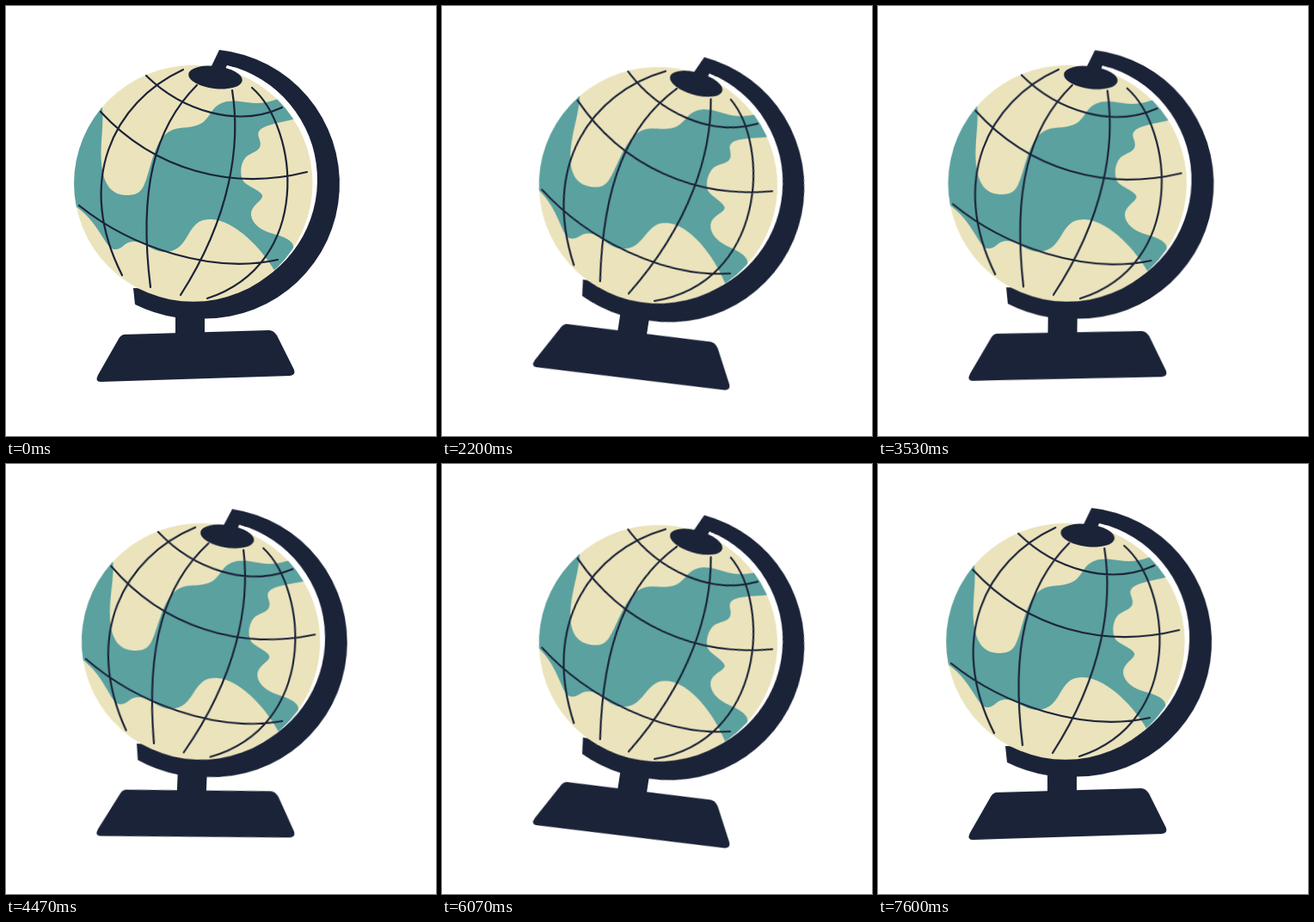
Animation of 500 by 500 pixels, one loop 7.66 s. Source, as an HTML page:

```html
<!DOCTYPE html>
<html lang="en">
<head>
<meta charset="utf-8">
<title>Rocking globe</title>
<style>
  html, body { margin: 0; width: 100%; height: 100%; overflow: hidden; background: #fff; }
  svg { display: block; width: 100%; height: 100%; }
  .ink { fill: #1b2338; }
  .sea { fill: #ebe3bb; }
  .land { fill: #5aa1a0; }
  .grid { fill: none; stroke: #1b2338; stroke-width: 2.2; stroke-linecap: round; }

  /* Paused: the script picks the pose through --n, in steps of 40 ms. */
  #toy {
    --n: 0;
    transform-origin: 221px 427px;
    animation: rock 3840ms infinite paused;
    animation-delay: calc(var(--n) * -40ms);
  }
  @keyframes rock {
    0% { transform: rotate(0deg); animation-timing-function: cubic-bezier(.333, 0, .667, 1); }
    50% { transform: rotate(9.9deg); animation-timing-function: cubic-bezier(.167, 0, .667, 1); }
    100% { transform: rotate(0deg); }
  }
</style>
</head>
<body>
<svg viewBox="0 0 500 500">
  <defs>
    <ellipse id="ball" cx="217.8" cy="206.3" rx="138.7" ry="137.5"/>
    <clipPath id="inside"><use href="#ball"/></clipPath>
  </defs>
  <g id="toy">
    <!-- base, then foot and arm -->
    <path class="ink" d="M137 382Q133 383 131 387L107 429Q103 437 110 437L330 430Q337 429 335 423L315 383Q311 377 306 377Z"/>
    <path class="ink" d="M148 328L150 347Q172 358 197 362V386H231V363.5
      A156.7 156.7 0 0 0 248 51L257 68.8A137 137 0 0 1 272 330.7Z"/>

    <use class="sea" href="#ball"/>
    <path class="land" clip-path="url(#inside)" d="M60 100L112 118
      C114 140 109 160 111 183S122 220 140 220S160 212 166 192S178 144 202 142
      S230 137 239 123S262 109 280 112S312 111 330 102L340 130
      C318 137 288 138 294 153S290 168 281 174S271 199 277 205S300 216 298 222
      S284 233 285 243S296 261 311 265S344 276 328 292L345 300L313 309
      C300 286 268 249 238 248S216 284 186 286
      C170 286 163 275 150 274S137 283 126 283S108 248 76 230Z"/>

    <!-- meridians, then parallels -->
    <path class="grid" d="M206 74C124 112 80 205 135 313
      M222 92C172 142 154 215 168 327
      M263 98C273 160 262 244 203 336
      M286 95C340 142 358 299 234 340
      M163 81C205 122 269 142 321 118
      M110 123C173 191 262 215 350 193
      M85 232C146 281 240 312 316 295"/>

    <!-- polar cap and its stem -->
    <ellipse class="ink" cx="243.5" cy="83" rx="31.5" ry="13" transform="rotate(7 243.5 83)"/>
    <path class="ink" d="M248 51L236 76L253 78L257 68.8L266 71.3Z"/>
  </g>
</svg>
<script>
  const LOOP = 7660;
  const toy = document.getElementById('toy');
  const begin = performance.now();

  // The picture ticks 30 times a second and holds its pose on every sixth tick.
  function pose(t) {
    const tick = Math.floor((t + 4) * 0.03);
    return 5 * Math.floor(tick / 6) + Math.max(0, tick % 6 - 1);
  }

  function draw() {
    const t = Math.max(0, performance.now() - begin) % LOOP;
    toy.style.setProperty('--n', pose(t));
    requestAnimationFrame(draw);
  }
  draw();
</script>
</body>
</html>
```
